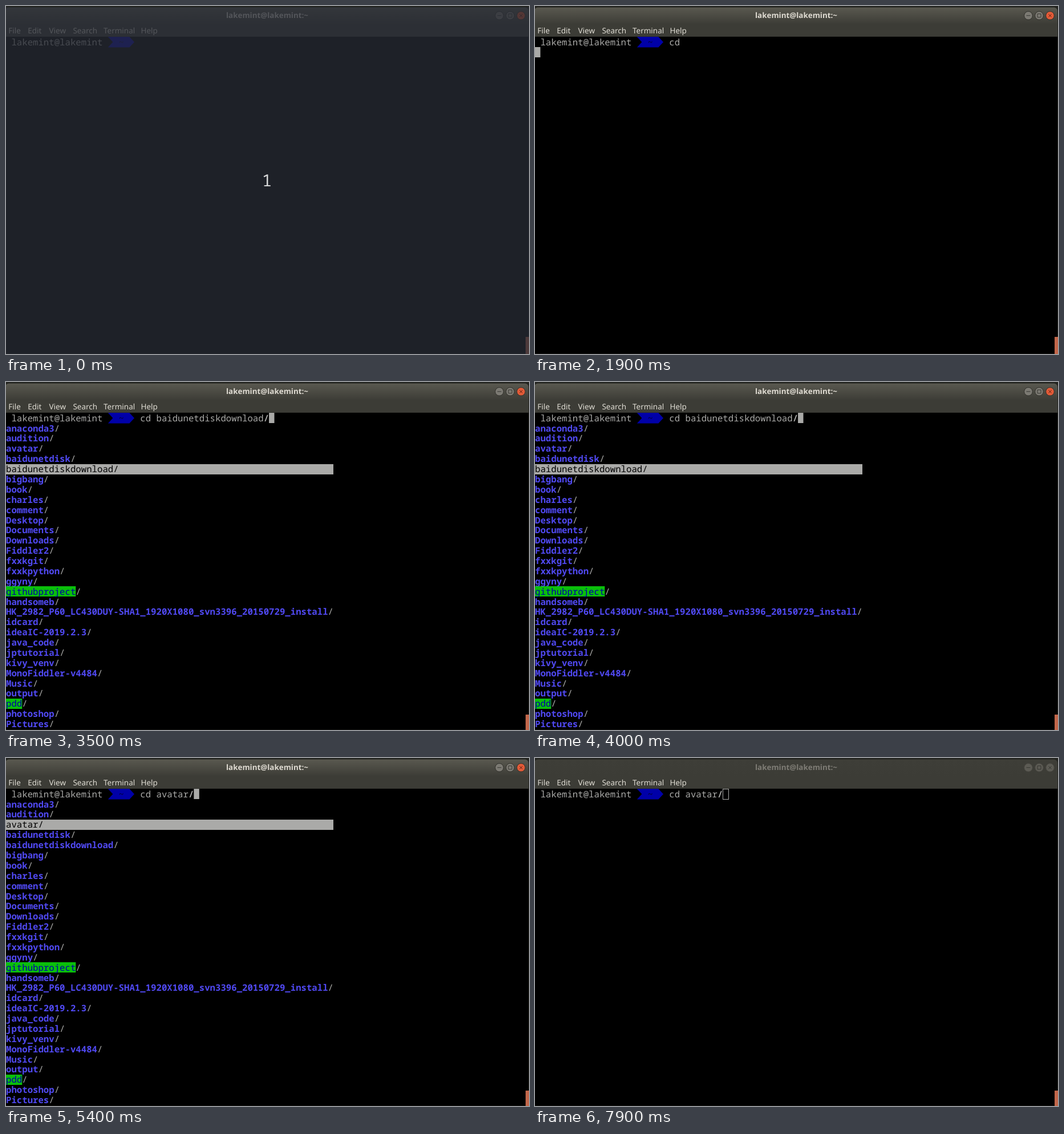
An HTML page with a canvas that plays this animation: 917x610 px, repeating every 8000 ms.

```html
<!DOCTYPE html>
<html lang="en">
<head>
<meta charset="utf-8">
<title>Terminal completion</title>
<style>
html, body { margin: 0; width: 100%; height: 100%; overflow: hidden; background: #000; }
canvas { display: block; }
</style>
</head>
<body>
<canvas id="stage" width="917" height="610"></canvas>
<script>
const ctx = document.getElementById('stage').getContext('2d');
const W = 917, H = 610, LOOP = 8000;
const CELL = 9.41, LINE = 17.88, TOP = 54.5;
const USER = 'lakemint@lakemint';
const MONO_FAMILY = '"Noto Sans Mono", "DejaVu Sans Mono", monospace';
const MONO = '15.68px ' + MONO_FAMILY;
const SANS = '"Noto Sans", "Open Sans", sans-serif';
const GREY = '#aaaaa8', BLUE = '#0000a8', DIR = '#5049f2', GREEN = '#0abf0a';

const dirs = `anaconda3 audition avatar baidunetdisk baidunetdiskdownload bigbang book
charles comment Desktop Documents Downloads Fiddler2 fxxkgit fxxkpython ggyny githubproject
handsomeb HK_2982_P60_LC430DUY-SHA1_1920X1080_svn3396_20150729_install idcard ideaIC-2019.2.3
java_code jptutorial kivy_venv MonoFiddler-v4484 Music output pdd photoshop Pictures`.split(/\s+/);
const shared = ['githubproject', 'pdd'];

// Each step changes part of the state from its time on.
const steps = [
  [0, { cmd: '', cursor: 'off', pick: -1, list: false, focus: true, count: true }],
  [100, { count: false }],
  [400, { cursor: 'on' }],
  [800, { cmd: 'cd' }],
  [1300, { cursor: 'off' }],
  [1400, { cursor: 'on' }],
  [1900, { cursor: 'below' }],
  [2200, { cursor: 'on', list: true, pick: 0 }],
  [2400, { cursor: 'off' }],
  [3000, { cursor: 'on' }],
  [3200, { pick: 1 }],
  [3400, { pick: 2 }],
  [3500, { pick: 4 }],
  [3700, { pick: 5 }],
  [4000, { pick: 4 }],
  [4200, { pick: 3 }],
  [4300, { pick: 2 }],
  [4900, { pick: 4 }],
  [5200, { pick: 3 }],
  [5400, { pick: 2 }],
  [5900, { list: false }],
  [6400, { cursor: 'off' }],
  [7000, { cursor: 'on' }],
  [7600, { cursor: 'off' }],
  [7900, { cursor: 'hollow', focus: false }]
];

function stateAt(t) {
  return Object.assign({}, ...steps.filter(s => s[0] <= t).map(s => s[1]));
}

function box(x, y, w, h, color) {
  ctx.fillStyle = color;
  ctx.fillRect(x, y, w, h);
}

function label(text, x, y, font, color, align = 'left') {
  ctx.font = font;
  ctx.fillStyle = color;
  ctx.textAlign = align;
  ctx.fillText(text, x, y);
}

// Terminal text sits on a fixed character grid.
function print(text, col, row, color, bold) {
  ctx.font = (bold ? 'bold ' : '') + MONO;
  ctx.fillStyle = color;
  ctx.textAlign = 'left';
  const y = TOP + row * LINE + 14.2;
  [...text].forEach((ch, i) => ctx.fillText(ch, (col + i) * CELL, y));
}

function cells(col, row, count, color) {
  const y = Math.round(TOP + row * LINE - 0.3);
  box(col * CELL, y, count * CELL, 18, color);
}

function button(x, kind, focus) {
  const hot = focus && kind === 'close';
  const y = 16.8;
  ctx.beginPath();
  ctx.arc(x, y, 7.3, 0, Math.PI * 2);
  ctx.fillStyle = hot ? '#e35b38' : focus ? '#7c7a73' : '#5c5b54';
  ctx.fill();
  ctx.lineWidth = 1;
  ctx.strokeStyle = focus ? '#30302b' : '#46453f';
  ctx.stroke();
  ctx.strokeStyle = hot ? '#5a2013' : '#34342f';
  ctx.beginPath();
  if (kind === 'min') {
    ctx.moveTo(x - 3.5, y);
    ctx.lineTo(x + 3.5, y);
  } else if (kind === 'max') {
    ctx.rect(x - 3, y - 3, 6, 6);
  } else {
    ctx.moveTo(x - 2.5, y - 2.5);
    ctx.lineTo(x + 2.5, y + 2.5);
    ctx.moveTo(x + 2.5, y - 2.5);
    ctx.lineTo(x - 2.5, y + 2.5);
  }
  ctx.stroke();
}

function drawFrame(focus) {
  box(0, 0, W, 54, '#22231f');
  const shade = ctx.createLinearGradient(0, 3, 0, 32);
  shade.addColorStop(0, focus ? '#59584f' : '#3e3e38');
  shade.addColorStop(1, '#3c3c36');
  ctx.fillStyle = shade;
  ctx.beginPath();
  ctx.roundRect(-1, 2.5, W, 51, [6, 6, 0, 0]);
  ctx.fill();
  label(USER + ':~', 458, 21.3, 'bold 13.4px ' + SANS, focus ? '#dfdbd2' : '#7e7c75', 'center');
  button(865, 'min', focus);
  button(884, 'max', focus);
  button(903, 'close', focus);
  const menu = { File: 4.3, Edit: 38.2, View: 75.5, Search: 117.4, Terminal: 171, Help: 236.5 };
  for (const name in menu) label(name, menu[name], 47.8, '13.5px ' + SANS, '#dfdcd3');
}

function drawPrompt() {
  print(USER, 1, 0, GREY);
  const x = 19 * CELL, y = 54, tip = 8.6;
  const end = 23 * CELL, mid = y + 9.3, low = y + 18.6;
  ctx.fillStyle = BLUE;
  ctx.beginPath();
  ctx.moveTo(x, y);
  ctx.lineTo(end, y);
  ctx.lineTo(end + tip, mid);
  ctx.lineTo(end, low);
  ctx.lineTo(x, low);
  ctx.lineTo(x + tip, mid);
  ctx.fill();
  print('~', 21, 0, '#000038');
}

function drawList(pick) {
  dirs.forEach((name, i) => {
    const row = i + 1;
    if (i === pick) {
      cells(0, row, 61, GREY);
      print(name + '/', 0, row, '#000');
      return;
    }
    const open = shared.includes(name);
    if (open) cells(0, row, name.length, GREEN);
    print(name, 0, row, open ? BLUE : DIR, !open);
    print('/', name.length, row, GREY);
  });
}

function drawCommand(s) {
  const name = s.pick < 0 ? '' : dirs[s.pick];
  const text = s.cmd + (name && ' ' + name);
  let col = 25 + text.length;
  print(text, 25, 0, GREY);
  if (name) print('/', col++, 0, GREY, true);
  if (s.cursor === 'on') cells(col, 0, 1, GREY);
  if (s.cursor === 'below') cells(0, 1, 1, GREY);
  if (s.cursor === 'hollow') {
    ctx.strokeStyle = GREY;
    ctx.lineWidth = 1;
    ctx.strokeRect(Math.round(col * CELL) + 0.5, 54.5, 10, 18);
  }
}

function draw(t) {
  const s = stateAt(t);
  box(0, 0, W, H, '#000');
  drawFrame(s.focus);
  drawPrompt();
  if (s.list) drawList(s.pick);
  drawCommand(s);
  box(916, 54, 1, H - 54, '#20201d');
  const thumb = t < 2200 ? 580 : 583;
  box(911, thumb, 6, H - thumb, '#c2664a');
  box(0, 609, 911, 1, '#141412');
  if (s.count) {
    box(0, 2, W, H - 2, 'rgba(40,44,53,0.76)');
    label('1', 457.5, 316, '29px ' + MONO_FAMILY, '#d6d7d8', 'center');
  }
}

ctx.textRendering = 'geometricPrecision';
const start = performance.now();
function tick() {
  draw((performance.now() - start) % LOOP);
  requestAnimationFrame(tick);
}
draw(0);
requestAnimationFrame(tick);
</script>
</body>
</html>
```
